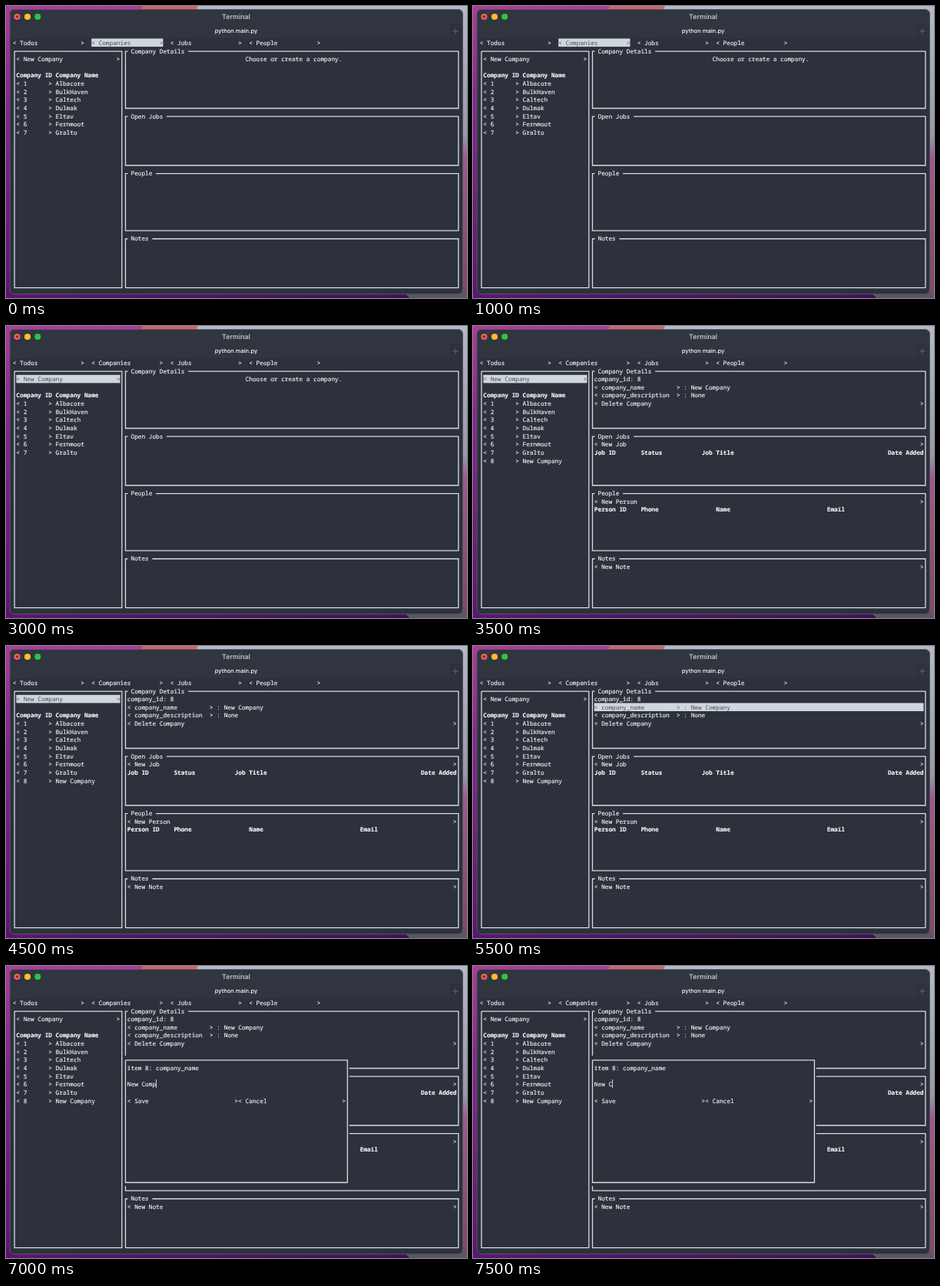
An HTML page that plays this animation: 600x381 px, repeating every 8000 ms.

```html
<!DOCTYPE html>
<html lang="en">
<head>
<meta charset="utf-8">
<title>Terminal</title>
<style>
html, body { margin: 0; width: 100%; height: 100%; overflow: hidden; background: #2c313c; }
svg { display: block; width: 600px; height: 381px; }
text { white-space: pre; text-rendering: geometricPrecision; }
.cell {
  font: 500 7.77px "Noto Sans Mono", "DejaVu Sans Mono", monospace;
  fill: #f5f6f8; stroke: #f5f6f8; stroke-width: .15;
}
.bold { font-weight: 700; }
.dark { fill: #464c57; stroke: none; }
.ui { font-family: Inter, Roboto, sans-serif; text-anchor: middle; }
.line { fill: none; stroke: #d9dce0; stroke-width: 1.3; }
.bar { fill: #d0d6dd; }
.caret { fill: #c9cdd4; shape-rendering: crispEdges; }

.timed { visibility: hidden; animation: 8s step-end infinite; }
#tab { animation-name: tab; }
#notesCaret { animation-name: notesCaret; }
#peopleCaret { animation-name: peopleCaret; }
#newFocus { animation-name: newFocus; }
#nameFocus { animation-name: nameFocus; }
#empty { animation-name: empty; }
#filled { animation-name: filled; }
#dialog { animation-name: dialog; }
#typed0 { animation-name: typed0; }
#typed1 { animation-name: typed1; }
#typed2 { animation-name: typed2; }
#typed3 { animation-name: typed3; }
@keyframes tab { 0% { visibility: visible } 18.75%, to { visibility: hidden } }
@keyframes notesCaret { 0%, 31.25%, to { visibility: hidden } 18.75% { visibility: visible } }
@keyframes peopleCaret { 0%, 37.5%, to { visibility: hidden } 31.25% { visibility: visible } }
@keyframes newFocus { 0%, 68.75%, to { visibility: hidden } 37.5% { visibility: visible } }
@keyframes nameFocus { 0%, 75%, to { visibility: hidden } 68.75% { visibility: visible } }
@keyframes empty { 0% { visibility: visible } 43.75%, to { visibility: hidden } }
@keyframes filled { 0% { visibility: hidden } 43.75%, to { visibility: visible } }
@keyframes dialog { 0% { visibility: hidden } 75%, to { visibility: visible } }
@keyframes typed0 { 0%, 81.25%, to { visibility: hidden } 75% { visibility: visible } }
@keyframes typed1 { 0%, 87.5%, to { visibility: hidden } 81.25% { visibility: visible } }
@keyframes typed2 { 0%, 93.75%, to { visibility: hidden } 87.5% { visibility: visible } }
@keyframes typed3 { 0% { visibility: hidden } 93.75%, to { visibility: visible } }
</style>
</head>
<body>
<svg id="stage" viewBox="0 0 600 381">
  <defs>
    <linearGradient id="leftEdge" x2="0" y2="1">
      <stop offset="0" stop-color="#b03a9e"/>
      <stop offset=".3" stop-color="#8a2594"/>
      <stop offset="1" stop-color="#5c1474"/>
    </linearGradient>
    <linearGradient id="rightEdge" x2="0" y2="1">
      <stop offset="0" stop-color="#b4b9c8"/>
      <stop offset=".44" stop-color="#9699aa"/>
      <stop offset=".52" stop-color="#a05a88"/>
      <stop offset="1" stop-color="#7c4868"/>
    </linearGradient>
    <linearGradient id="floor">
      <stop offset="0" stop-color="#5c1474"/>
      <stop offset="1" stop-color="#3f1052"/>
    </linearGradient>
  </defs>
  <rect width="600" height="381" fill="#b4b9c8"/>
  <path d="M0 0H178L150 190V381H0Z" fill="url(#leftEdge)"/>
  <path d="M178 0H250L246 8H174Z" fill="#c96473"/>
  <rect x="590" width="10" height="381" fill="url(#rightEdge)"/>
  <path d="M0 370H515L526 381H0Z" fill="url(#floor)"/>
  <path d="M515 370H594L600 381H526Z" fill="#5a5560"/>
  <rect x="5" y="4.500" width="589.500" height="371.500" rx="6" fill="#2c313c"/>
  <path d="M5 42V10.500Q5 4.500 11 4.500H588.500Q594.500 4.500 594.500 10.500V42Z" fill="#31353f"/>
  <rect x="577.500" y="23" width="17" height="19" fill="#2e323b"/>
  <rect x="5" y="4.500" width="589.500" height="371.500" rx="6" fill="none" stroke="#555a65"/>
  <circle cx="14.500" cy="14" r="4.100" fill="#e8605f"/>
  <circle cx="14.500" cy="14" r="1.400" fill="#7d1712"/>
  <circle cx="28" cy="14" r="4.100" fill="#fbbc2f"/>
  <circle cx="41.200" cy="14" r="4.100" fill="#2ac63f"/>
  <text class="ui" x="299.500" y="17" font-size="8.800" font-weight="600" fill="#c3c6cb">Terminal</text>
  <text class="ui" x="299.500" y="35" font-size="7.500" font-weight="500" fill="#fff">python main.py</text>
  <path d="M581.500 33H588.500M585 29.500V36.500" stroke="#6a6f79" stroke-width=".9"/>
</svg>
<script>
const stage = document.getElementById("stage");
const CW = 4.66, RH = 10.64;
const colX = c => 8.7 + c * CW;
const midX = c => colX(c + .5);
const midY = r => 48.4 + r * RH;
const topY = r => midY(r) - RH / 2 - .6;

function add(parent, tag, attrs, content = "") {
  const el = document.createElementNS("http://www.w3.org/2000/svg", tag);
  for (const key in attrs) el.setAttribute(key, attrs[key]);
  el.textContent = content;
  return parent.appendChild(el);
}
const timed = (id, parent = stage) => add(parent, "g", { id, class: "timed" });

function put(parent, col, row, str, style = "") {
  add(parent, "text", { class: "cell " + style, x: colX(col), y: midY(row) + 2.5 }, str);
}
function button(parent, col, row, label, end, style) {
  put(parent, col, row, "< " + label, style);
  put(parent, end, row, ">", style);
}
function box(parent, left, top, right, bottom, title) {
  const x = midX(left), y = midY(top);
  const start = title ? colX(left + 3 + title.length) : x;
  add(parent, "path", {
    class: "line",
    d: `M${start} ${y}H${midX(right)}V${midY(bottom)}H${x}V${y}H${title ? x + 3 : x}`
  });
  if (title) put(parent, left + 2, top, title);
}
function bar(parent, col, row, width) {
  add(parent, "rect", { class: "bar", x: colX(col), y: topY(row), width: width * CW, height: RH });
}
function caret(parent, col, row) {
  add(parent, "rect", { class: "caret", x: Math.floor(colX(col)), y: Math.floor(topY(row)), width: 1, height: 11 });
}
function company(parent, n, name) {
  button(parent, 1, 4 + n, n, 10);
  put(parent, 12, 4 + n, name);
}
function field(parent, row, name, value, style) {
  button(parent, 32, row, name, 55, style);
  put(parent, 57, row, ": " + value, style);
}

["Todos", "Companies", "Jobs", "People"].forEach((name, i) => button(stage, i * 22, 0, name, i * 22 + 19));
box(stage, 0, 1, 30, 30);
button(stage, 1, 2, "New Company", 29);
put(stage, 1, 4, "Company ID Company Name", "bold");
["Albacore", "BulkHaven", "Caltech", "Dulmak", "Eltav", "Fernmoot", "Gralto"]
  .forEach((name, i) => company(stage, i + 1, name));
box(stage, 31, 1, 124, 8, "Company Details");
box(stage, 31, 9, 124, 15, "Open Jobs");
box(stage, 31, 16, 124, 23, "People");
box(stage, 31, 24, 124, 30, "Notes");

put(timed("empty"), 65, 2, "Choose or create a company.");

const filled = timed("filled");
company(filled, 8, "New Company");
put(filled, 32, 2, "company_id: 8");
field(filled, 3, "company_name", "New Company");
field(filled, 4, "company_description", "None");
button(filled, 32, 5, "Delete Company", 123);
button(filled, 32, 10, "New Job", 123);
[[32, "Job ID"], [45, "Status"], [62, "Job Title"], [114, "Date Added"]]
  .forEach(([col, head]) => put(filled, col, 11, head, "bold"));
button(filled, 32, 17, "New Person", 123);
[[32, "Person ID"], [45, "Phone"], [66, "Name"], [97, "Email"]]
  .forEach(([col, head]) => put(filled, col, 18, head, "bold"));
button(filled, 32, 25, "New Note", 123);

const tab = timed("tab");
bar(tab, 22, 0, 20);
button(tab, 22, 0, "Companies", 41, "dark");

caret(timed("notesCaret"), 32, 25);
caret(timed("peopleCaret"), 32, 17);

const newFocus = timed("newFocus");
bar(newFocus, 1, 2, 29);
button(newFocus, 1, 2, "New Company", 29, "dark");

const nameFocus = timed("nameFocus");
bar(nameFocus, 32, 3, 92);
field(nameFocus, 3, "company_name", "New Company", "dark");

const dialog = timed("dialog");
add(dialog, "rect", {
  x: colX(31), y: topY(7), width: 63 * CW, height: 16 * RH, fill: "#2c313c"
});
box(dialog, 31, 7, 93, 22);
put(dialog, 32, 8, "item 8: company_name");
button(dialog, 32, 12, "Save", 62);
button(dialog, 63, 12, "Cancel", 92);
[11, 10, 8, 5].forEach((length, i) => {
  const typed = timed("typed" + i);
  put(typed, 32, 10, "New Company".slice(0, length));
  caret(typed, 32 + length, 10);
});
</script>
</body>
</html>
```
